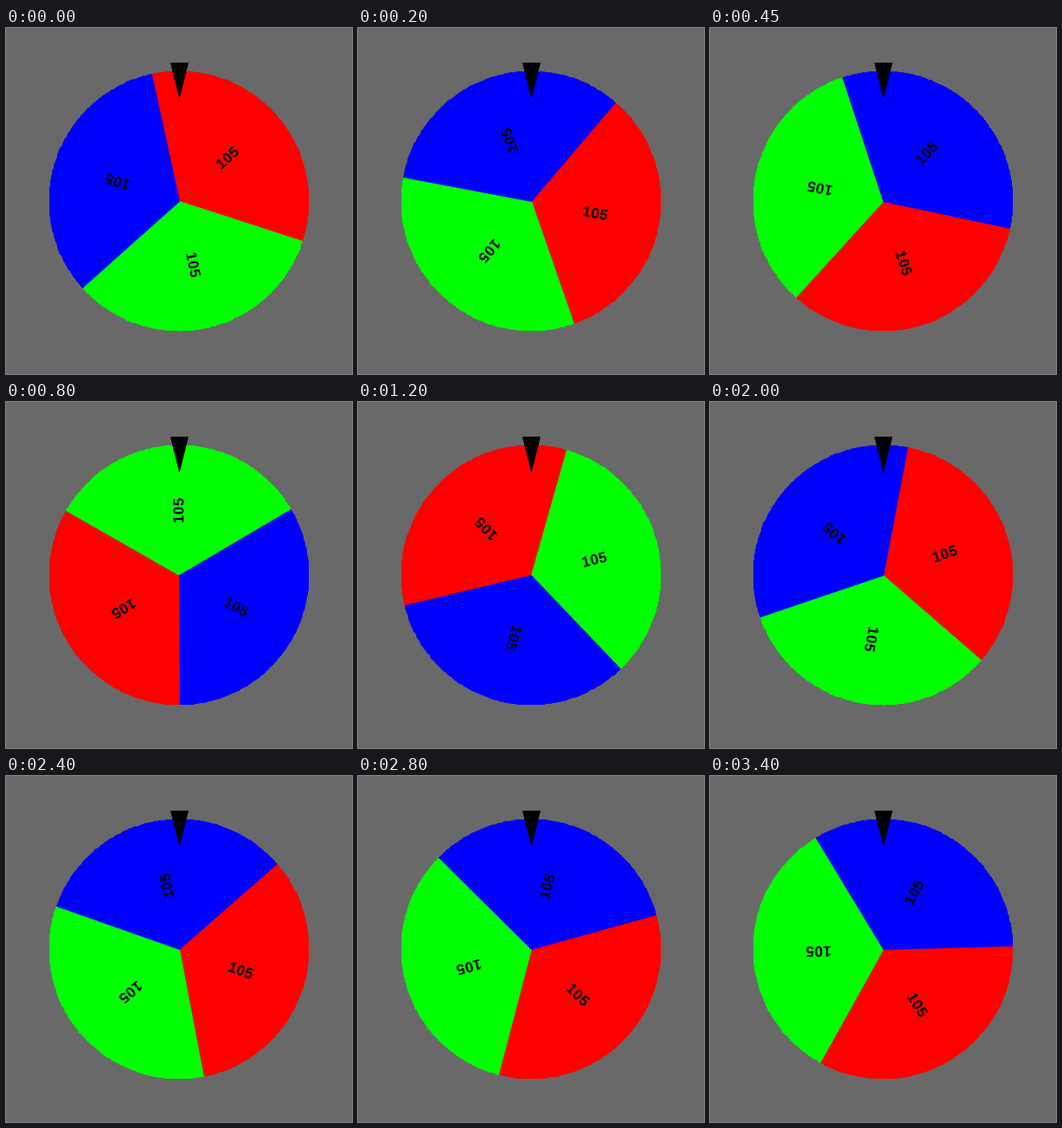
An HTML page that plays this animation: 400x400 px, repeating every 3900 ms.

```html
<!DOCTYPE html>
<html lang="en">
<head>
<meta charset="utf-8">
<title>Wheel</title>
<style>
  html, body { margin: 0; width: 100%; height: 100%; overflow: hidden; background: #696969; }
  svg { display: block; width: 100%; height: 100%; shape-rendering: crispEdges; }
  polygon { stroke-width: 0.9; stroke-linejoin: round; }
  text { font: bold 17px "Liberation Sans", Arial, sans-serif; letter-spacing: 0.5px; text-anchor: middle; }
</style>
</head>
<body>
<svg viewBox="0 0 400 400">
  <g id="wheel" transform="translate(0.5 0.5)"></g>
  <polygon points="190.5,40.5 210.5,40.5 200.5,80.5" stroke="#000"/>
</svg>
<script>
const STEP = 50, LAST_STEP = 68, LOOP = 3900;
const START = -12, SPEED = 13.575, BRAKE = 0.2; // degrees, per step
const CENTER = 200, RADIUS = 150, SPAN = 120;
const wheel = document.getElementById('wheel');

const colors = ['#f00', '#0f0', '#00f'];
wheel.innerHTML =
  colors.map(color => `<polygon fill="${color}" stroke="${color}"/>`).join('') +
  colors.map(() => '<text x="75.2" y="5.2">105</text>').join('');
const slices = wheel.querySelectorAll('polygon');
const labels = wheel.querySelectorAll('text');

// The wheel slows down evenly, then rests until the loop restarts.
function angleAt(step) {
  return START + SPEED * step - BRAKE / 2 * step * step;
}

// Rim points sit on whole pixels, which gives the slightly uneven outline.
function rimPoint(degrees) {
  const a = (degrees - 90) * Math.PI / 180;
  return [Math.cos(a), Math.sin(a)].map(v => Math.floor(CENTER + RADIUS * v + 1e-6));
}

function slicePoints(start) {
  const points = [[CENTER, CENTER]];
  for (let d = 0; d <= SPAN; d++) points.push(rimPoint(start + d));
  return points.join(' ');
}

const origin = performance.now();
let shown = -1;

function draw() {
  const time = Math.max(0, performance.now() - origin) % LOOP;
  const step = Math.min(LAST_STEP, Math.floor(time / STEP));
  if (step !== shown) {
    shown = step;
    colors.forEach((_, i) => {
      const start = angleAt(step) + i * SPAN;
      slices[i].setAttribute('points', slicePoints(start));
      labels[i].setAttribute('transform',
        `translate(${CENTER} ${CENTER}) rotate(${start + SPAN / 2 - 90})`);
    });
  }
  requestAnimationFrame(draw);
}
draw();
</script>
</body>
</html>
```
